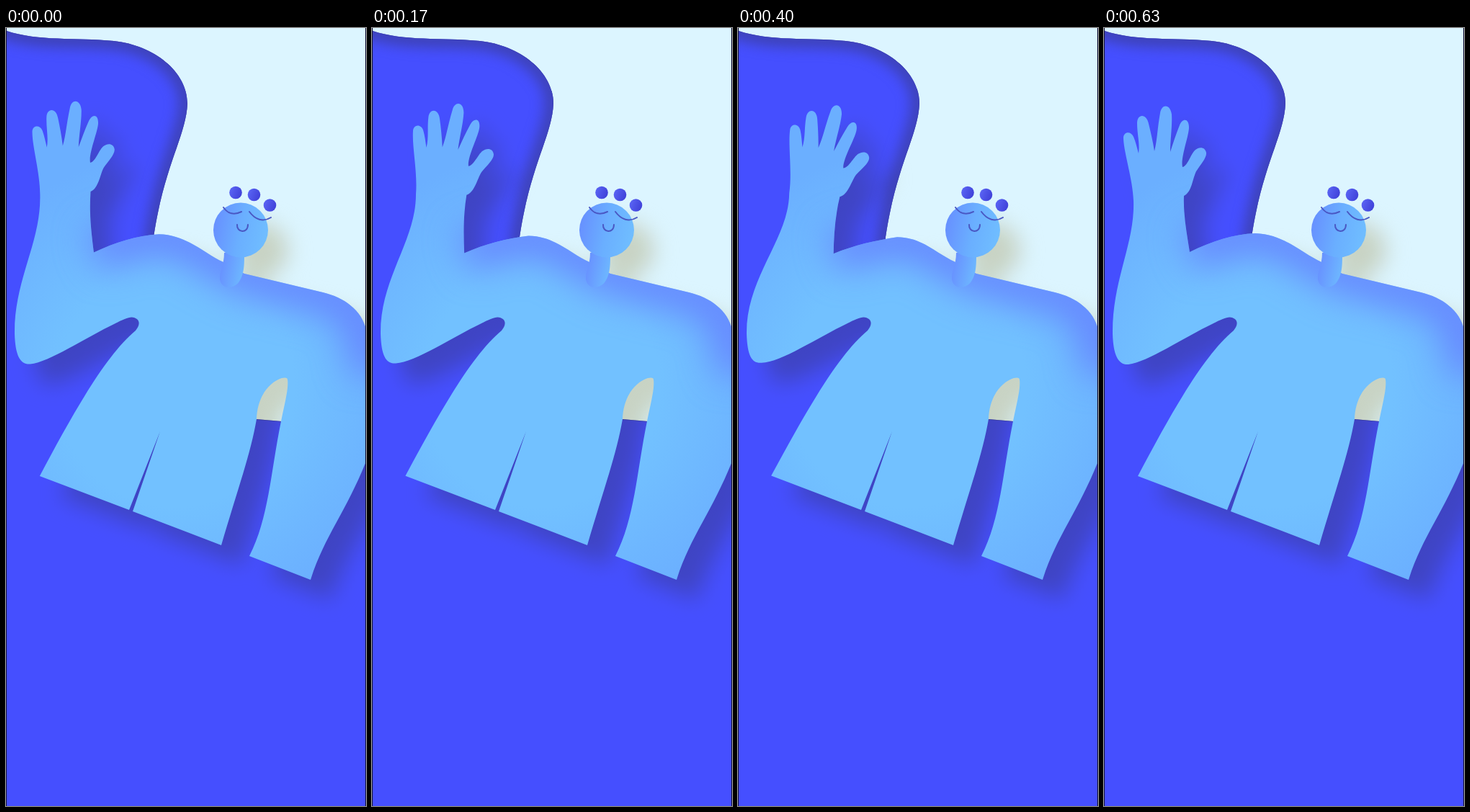
These frames come from a looping animation (500x1080 px, 660 ms). An HTML page:

```html
<!DOCTYPE html>
<html lang="en">
<head>
<meta charset="utf-8">
<title>Waving figure</title>
<style>
html, body { margin: 0; width: 100%; height: 100%; overflow: hidden; background: #454fff; }
svg { display: block; width: 100vw; height: 100vh; }
</style>
</head>
<body>
<svg viewBox="0 0 500 1080" preserveAspectRatio="none">
  <defs>
    <path id="hill" d="M-10 0 C40 20 90 12 150 18 C205 24 252 60 252 105 C250 150 220 190 205 290 C195 400 260 533 348 543 L383 546 L520 560 V1100 H-10 Z"/>
    <path id="body"/>
    <path id="neck" d="M303 312 C303 330 296 338 297 349 C300 365 319 362 325 350 C331 340 331 328 331 312 Z"/>
    <circle id="head" cx="326" cy="280.500" r="38"/>
    <clipPath id="inHill"><use href="#hill"/></clipPath>
    <clipPath id="inBody"><use href="#body"/></clipPath>
    <radialGradient id="skin" gradientUnits="userSpaceOnUse" cx="235" cy="500" r="330">
      <stop offset=".5" stop-color="#72c1ff"/>
      <stop offset="1" stop-color="#6bafff"/>
    </radialGradient>
    <linearGradient id="face" x1="0" y1=".4" x2="1" y2=".6">
      <stop offset="0" stop-color="#6790ff"/>
      <stop offset=".5" stop-color="#6aafff"/>
      <stop offset="1" stop-color="#70beff"/>
    </linearGradient>
    <linearGradient id="neckTone" x1="0" y1="0" x2="1" y2=".3">
      <stop offset="0" stop-color="#678bff"/>
      <stop offset="1" stop-color="#6db6ff"/>
    </linearGradient>
    <linearGradient id="bead" x1="0" y1=".3" x2="1" y2=".7">
      <stop offset="0" stop-color="#5a64f4"/>
      <stop offset="1" stop-color="#3f40d8"/>
    </linearGradient>
    <filter id="soft" filterUnits="userSpaceOnUse" x="-80" y="-80" width="700" height="1240" color-interpolation-filters="sRGB">
      <feGaussianBlur stdDeviation="15"/>
    </filter>
    <filter id="shade" filterUnits="userSpaceOnUse" x="-80" y="-80" width="700" height="1240" color-interpolation-filters="sRGB">
      <feGaussianBlur stdDeviation="24"/>
    </filter>
    <filter id="rim" filterUnits="userSpaceOnUse" x="-80" y="-80" width="700" height="1240" color-interpolation-filters="sRGB">
      <feGaussianBlur stdDeviation="9"/>
    </filter>
  </defs>

  <rect width="500" height="1080" fill="#dcf5ff"/>
  <use href="#hill" fill="#454fff"/>
  <g clip-path="url(#inHill)" fill="none" stroke="#3b3e9e">
    <path id="crest" stroke-width="24" stroke-opacity=".75" filter="url(#rim)"
      d="M-60 -20 L-10 0 C40 20 90 12 150 18 C205 24 252 60 252 105 C250 150 220 190 205 290 L198 360"/>
    <use href="#hill" stroke-width="1.500" stroke-opacity=".6"/>
  </g>

  <!-- cast shadow -->
  <g transform="translate(28 28)" fill="#e8dcc4" filter="url(#soft)" style="mix-blend-mode:multiply">
    <use href="#body"/>
    <use href="#neck"/>
    <use href="#head"/>
  </g>

  <use href="#body" fill="url(#skin)"/>
  <g clip-path="url(#inBody)">
    <path id="topShade" fill="none" stroke="#6680ff" stroke-width="58" stroke-opacity=".85" filter="url(#shade)"/>
  </g>

  <use href="#neck" fill="url(#neckTone)"/>
  <use href="#head" fill="url(#face)"/>
  <g fill="url(#bead)">
    <circle cx="319" cy="228.500" r="8.800"/>
    <circle cx="344.500" cy="231.500" r="8.800"/>
    <circle cx="366.500" cy="246" r="8.800"/>
  </g>
  <g fill="none" stroke="#4a58c4" stroke-width="2" stroke-linecap="round">
    <path d="M302 249 C308 258 317 260 327 255"/>
    <path d="M338 255 C346 266 357 270 368 263"/>
    <path d="M321 273 C320 284 336 286 336 273"/>
  </g>
  <path d="M.5 0V1080M499.500 0V1080" stroke="#15143c"/>
</svg>

<script>
const LOOP = 660, STEP = 100 / 3;
const PIVOT = [115, 410];
const REACH = 22.3;                          // degrees at the far end of a wave
const RESTS = [-.47, 4.25, 8.35, 13.1];      // steps at which the arm is back on the left
const body = document.getElementById('body');
const topShade = document.getElementById('topShade');

// Cubic points from the outer wrist over the fingers and thumb to the inner wrist.
const HAND = [
  41,240, 40,210, 28,175, 27,154, 26,144, 37,142, 41,151, 44,158, 46,167,
  48,174, 50,160, 46,148, 46,132, 46,119, 59,118, 62,133, 65,145, 68,158,
  70,171, 74,155, 74,140, 78,118, 80,105, 92,105, 94,120, 95,135, 92,155,
  92,172, 96,160, 100,147, 105,135, 109,125, 118,125, 118,138, 118,150, 106,180,
  109,193, 116,192, 120,176, 126,170, 131,165, 140,164, 142,173, 143,180, 134,190,
  128,199, 123,209, 122,228, 111,233
];

// 0 on the left, 1 on the right, back to 0 at the next rest.
function waveAt(n) {
  const i = RESTS.findIndex((rest, j) => n >= rest && n < RESTS[j + 1]);
  if (i < 0) return 0;
  return Math.sin(Math.PI * (n - RESTS[i]) / (RESTS[i + 1] - RESTS[i])) ** 2;
}

const join = points => points.map(v => v.toFixed(2)).join(' ');

function draw(wave) {
  const angle = wave * REACH * Math.PI / 180;
  const cos = Math.cos(angle), sin = Math.sin(angle);
  const lift = 180 * wave * Math.exp(-wave / .09);
  const turn = (x, y) => {
    const dx = x - PIVOT[0], dy = y - PIVOT[1];
    return [PIVOT[0] + dx * cos - dy * sin, PIVOT[1] + dx * sin + dy * cos - lift];
  };
  const mix = (x, y, x2, y2) => [x + (x2 - x) * wave, y + (y2 - y) * wave];

  const hand = [];
  for (let i = 0; i < HAND.length; i += 2) hand.push(...turn(HAND[i], HAND[i + 1]));

  const pit = mix(119, 311, 150, 316);
  const shoulder = [
    ...mix(150, 296, 175, 309), ...mix(180, 286, 205, 306), ...mix(210, 285, 235, 297),
    ...mix(250, 286, 263, 296), 275, 313, 302, 325
  ];
  const elbow = mix(34, 467, 31, 462);
  const arm = [
    ...mix(20, 468, 18, 463), 13, 455, 12, 425,
    ...mix(11, 350, 11, 340), ...mix(43, 300, 105, 285), ...hand,
    ...mix(110, 260, 166, 264), ...mix(115, 285, 156, 293), ...pit
  ];
  const corner = mix(47, 622, 45, 621);

  const top = `M${join(pit)} C${join(shoulder)} L331 341 L440 367 C470 374 494 392 500 418`;
  body.setAttribute('d', top +
    ' L520 470 V560 L500 602 C472 672 442 706 423 766 L338 733' +
    ' C365 680 367 620 382 546 C386 525 393 500 391 488 C391 485 387 485 383 486' +
    ' C365 492 349 512 348 543 C340 590 322 640 299 718' +
    ` L176 671 L214 560 L171 669 L${join(corner)}` +
    ' C93 535 138 455 180 420 C186 413 187 405 178 402 C172 400 164 404 152 410' +
    ` C110 430 60 464 ${join(elbow)} C${join(arm)} Z`);
  topShade.setAttribute('d', top + ' L510 480');
}

function frame() {
  const t = performance.now() % LOOP;
  draw(waveAt(Math.floor((t + 4) / STEP)));
  requestAnimationFrame(frame);
}
frame();
</script>
</body>
</html>
```
